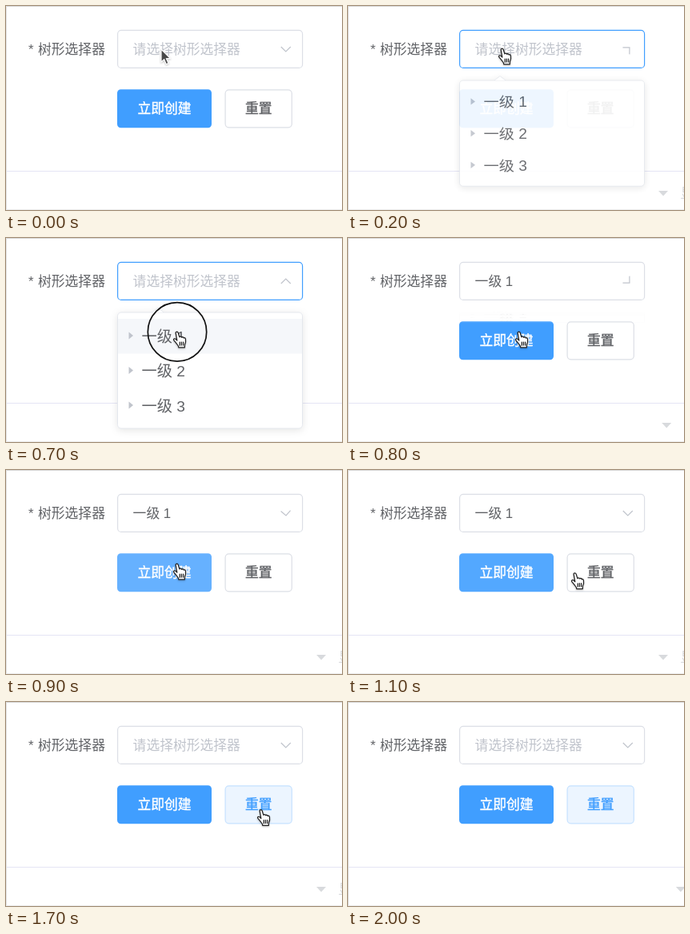
An HTML page that plays this animation: 420x255 px, repeating every 2100 ms.

```html
<!DOCTYPE html>
<html lang="zh-CN">
<head>
<meta charset="utf-8">
<title>树形选择器</title>
<style>
html, body { margin: 0; width: 100%; height: 100%; overflow: hidden; background: #fff; }
svg { display: block; width: 420px; height: 255px; }
text { font: 16.8px "Liberation Sans", "Noto Sans CJK SC", "Noto Sans CJK", sans-serif; fill: #606266; }
.button { stroke: currentColor; fill: currentColor; stroke-width: .4; color: #606266; }
.box { fill: #fff; stroke: #dcdfe6; stroke-width: 1.2; }
#menu { filter: drop-shadow(0 2px 5px rgba(0, 0, 0, .1)); }
#menu text { font-size: 19.2px; }
.panel { fill: #fff; stroke: #e4e7ed; }
.hint { fill: #d8dadd; }
#chevron { fill: none; stroke: #c0c4cc; stroke-width: 1.2; }
#hand { fill: #fff; stroke: #222; stroke-width: 1.4; stroke-linejoin: round; stroke-linecap: round; }
#arrow { fill: #484848; stroke: #fff; stroke-width: 1.2; }
#cursor { filter: drop-shadow(0 1px 1px rgba(0, 0, 0, .25)); }
#ring { fill: none; stroke: #111; stroke-width: 1.7; }
</style>
</head>
<body>
<svg viewBox="0 0 420 255">
  <path d="M0 .5H420" stroke="#d9d9d9"/>
  <path d="M.5 0V255" stroke="#e2e2e2"/>
  <path d="M0 254.5H420" stroke="#ececec"/>
  <path d="M1 206.5H420" stroke="#e4e5f5"/>

  <text x="28" y="60">*</text>
  <text x="40" y="60">树形选择器</text>

  <rect id="field" class="box" x="139.6" y="30.4" width="231" height="47" rx="4.5"/>
  <text id="value" x="158.6" y="60"></text>
  <path id="chevron" d="M-6 3L0 -3L6 3"/>

  <rect id="create" x="139" y="104.3" width="118" height="48" rx="4.5"/>
  <text class="button" x="164.5" y="134" style="color:#fff">立即创建</text>
  <rect id="reset" class="box" x="274.1" y="104.8" width="83.2" height="47" rx="4.5"/>
  <text id="resetText" class="button" x="299" y="134">重置</text>

  <path id="caret" class="hint" d="M-6 -3H6L0 3.5Z"/>
  <text id="hintText" class="hint" x="415.5" y="240">显示代码</text>

  <g id="menu">
    <rect class="panel" x="139.5" y="93" width="231" height="145" rx="4.5"/>
    <path class="panel" d="M183 93L190 87L197 93"/>
    <rect id="hover" x="140" y="101" width="230" height="43.5" fill="#f5f7fa"/>
    <g id="items"></g>
  </g>

  <g id="pointer">
    <circle id="ring" cy=".4" r="36.7"/>
    <g id="cursor">
      <path id="arrow" transform="translate(1 1)" d="M0 0V16L3.7 12.8L6.2 18.8L9 17.6L6.4 11.8L11.2 11.4Z"/>
      <path id="hand" transform="translate(0 1.5) scale(.9)" d="M-2 .5C-2.6 -1.6 .6 -2.2 1.3 0L3.2 6C3.6 4.8 5.8 4.8 6.2 6.4C7 5.4 8.8 5.8 9 7.2C10 6.6 11.4 7.2 11.6 8.6C12 11 12 14 10.5 16.5L10.3 20.5H2L1.6 18.5C0 16 -2.5 13 -4.6 10.5C-5.8 8.8 -3.6 7.2 -2 8.8L-.2 10.6ZM3.6 13v4.5M6 12.8v4.5M8.4 12.8v4.5"/>
    </g>
  </g>
</svg>
<script>
const STEP = 100, STEPS = 21;
const CLICK_FIELD = 1, CLICK_OPTION = 7, CLICK_RESET = 14;
const FIELD = [193, 53], OPTION = [214, 117], RESET = [319, 134.5];
const $ = id => document.getElementById(id);

$('items').innerHTML = [1, 2, 3].map((n, i) => {
  const y = 122.5 + i * 43.5;
  return `<path d="M153.5 ${y - 5}V${y + 4}L159 ${y - .5}Z" fill="#c0c4cc"/>
    <text x="169.5" y="${y + 7}">一级 ${n}</text>`;
}).join('');

// Goes from 0 to 1 over a number of steps; a higher power eases out harder.
function ramp(s, from, length, power = 1) {
  const p = Math.min(1, Math.max(0, (s - from) / length));
  return 1 - (1 - p) ** power;
}

// On after one click, off again after a later one.
const pulse = (s, on, off, power) => ramp(s, on, 3, power) - ramp(s, off, 3, power);

function pointerAt(s) {
  const toOption = ramp(s, 3, 3), toReset = ramp(s, 9, 3);
  return FIELD.map((v, i) => v + (OPTION[i] - v) * toOption + (RESET[i] - OPTION[i]) * toReset);
}

function set(id, style, transform) {
  Object.assign($(id).style, style);
  if (transform) $(id).setAttribute('transform', transform);
}

const show = (id, on) => set(id, { display: on ? '' : 'none' });

function draw(s) {
  const focused = s >= CLICK_FIELD && s < CLICK_OPTION + 1;
  const chosen = s > CLICK_OPTION && s <= CLICK_RESET;
  const over = s >= 12, pressed = s === CLICK_RESET;

  set('field', { stroke: focused ? '#409eff' : '#dcdfe6' });
  $('value').textContent = chosen ? '一级 1' : '请选择树形选择器';
  set('value', { fill: chosen ? '#606266' : '#c0c4cc' });
  const turn = 180 * (1 - pulse(s, CLICK_FIELD, CLICK_OPTION, 3.4));
  set('chevron', {}, `translate(349.8 54) rotate(${turn})`);

  const open = pulse(s, CLICK_FIELD, CLICK_OPTION, 6);
  set('menu', { opacity: open }, `translate(0 93) scale(1 ${open}) translate(0 -93)`);
  show('hover', s >= 5);

  const lit = ramp(s, 8, 1) - ramp(s, 10, 2);
  set('create', { fill: `color-mix(in srgb, #66b1ff ${lit * 100}%, #409eff)` });
  set('reset', {
    fill: over ? '#ecf5ff' : '#fff',
    stroke: pressed ? '#a6d0fb' : over ? '#c6e2ff' : '#dcdfe6'
  });
  set('resetText', { color: over ? '#409eff' : '#606266' });

  // The hint slides in while the pointer is over the form, not over the menu.
  const hint = pulse(s, 0, 4, 6) + ramp(s, 7, 3, 6) - ramp(s, 19, 3, 1.5);
  set('caret', {}, `translate(${442 - 48 * hint} 234)`);
  set('hintText', { opacity: ramp(hint, .92, .08) });

  const [x, y] = pointerAt(s);
  set('pointer', {}, `translate(${x} ${y})`);
  set('cursor', { opacity: 1 - ramp(s, 18, 2) });
  show('arrow', s === 0);
  show('hand', s > 0);
  show('ring', [CLICK_FIELD, CLICK_OPTION, CLICK_RESET].includes(s));
}

const start = performance.now();
function tick() {
  const t = Math.max(0, performance.now() - start);
  draw(Math.floor(t / STEP) % STEPS);
  requestAnimationFrame(tick);
}
tick();
</script>
</body>
</html>
```
